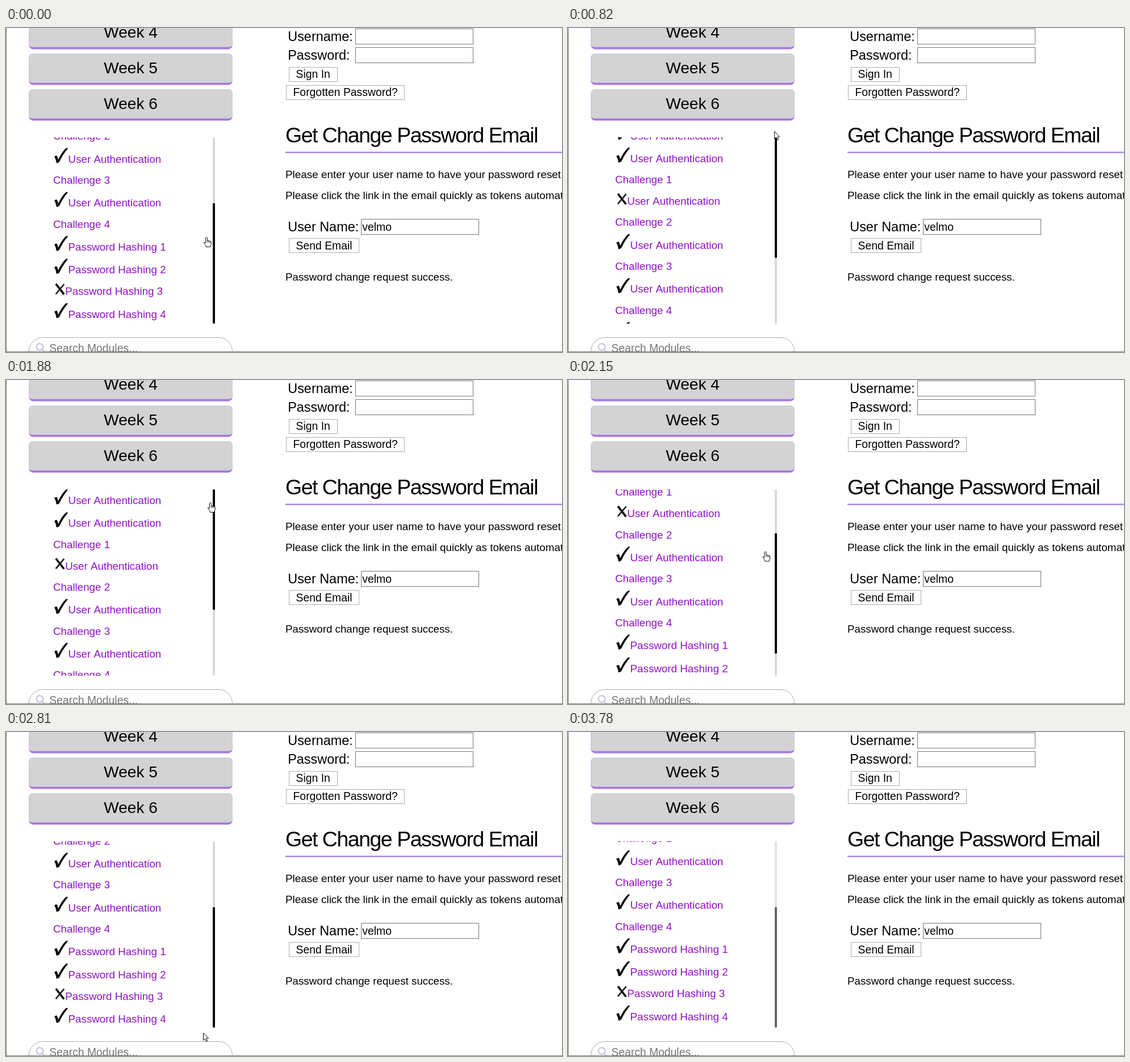
These frames come from a looping animation (979 by 572 pixels, 4340 ms). An HTML page with a canvas:

```html
<!DOCTYPE html>
<html lang="en">
<head>
<meta charset="utf-8">
<title>Module list scrolling</title>
<style>
  html, body { margin: 0; width: 100%; height: 100%; overflow: hidden; background: #fff; }
  canvas { display: block; }
</style>
</head>
<body>
<canvas id="stage" width="979" height="572"></canvas>
<script>
const ctx = document.getElementById('stage').getContext('2d');
const LOOP = 4340;
const LEAD = 20;
const FONT = '"Liberation Sans", Arial, sans-serif';
const PURPLE = '#a675ea';
const LINK = '#9010c4';
const LIST = { top: 193, height: 329, thumb: 213 };

// Two drags of the scrollbar; durations are counted in steps of `step` ms.
// The content follows the thumb late: `delay` and `shape` set its ease.
const up = {
  start: 0, step: 140, from: 38, to: 212.6, delay: 4.345, shape: 2.22,
  thumb: [1, 0], drag: 4.95, grip: 6,
  path: [[0, 353, 369], [4, 355, 223], [6, 363, 182], [9, 363, 182], [11, 363, 169]]
};
const down = {
  start: 1880, step: 135, from: 212.6, to: 35.1, delay: 2.535, shape: 1.3,
  thumb: [0, 1], drag: 3, grip: 4, release: 9, leave: 14,
  path: [[0, 360, 216], [4, 335, 389], [5, 347, 530], [8, 347, 531],
    [10, 463, 329], [11, 545, 340], [13, 570, 324]]
};

const rowHeight = { check: 40.35, cross: 37.9, plain: 37.3 };
const indent = { check: 109.6, cross: 104.2, plain: 83 };
const rows = [['check', 'User Authentication']];
for (let n = 1; n <= 4; n++) {
  rows.push([n === 2 ? 'cross' : 'check', 'User Authentication'], ['plain', 'Challenge ' + n]);
}
for (let n = 1; n <= 4; n++) {
  rows.push([n === 3 ? 'cross' : 'check', 'Password Hashing ' + n]);
}

const mix = (a, b, p) => a + (b - a) * p;

function along(path, k) {
  const n = path.findIndex(p => p[0] > k);
  if (n < 0) return path[path.length - 1].slice(1);
  const [a, b] = [path[n - 1], path[n]];
  const p = (k - a[0]) / (b[0] - a[0]);
  return [mix(a[1], b[1], p), mix(a[2], b[2], p)];
}

function text(str, x, y, size = 18.75, color = '#000', spacing = 0) {
  ctx.font = `${size}px ${FONT}`;
  ctx.letterSpacing = spacing + 'px';
  ctx.fillStyle = color;
  ctx.fillText(str, x, Math.round(y));
}

function rect(x, y, w, h, color) {
  ctx.fillStyle = color;
  ctx.fillRect(x, y, w, h);
}

function round(x, y, w, h, r, color) {
  ctx.beginPath();
  ctx.roundRect(x, y, w, h, r);
  ctx.fillStyle = color;
  ctx.fill();
}

function frame(x, y, w, h, color) {
  ctx.strokeStyle = color;
  ctx.lineWidth = 1;
  ctx.strokeRect(x + .5, Math.round(y) + .5, w - 1, h - 1);
}

function week(n) {
  const y = 45 + (n - 5) * 63;
  const inner = { x: 8, y: 4 };
  round(40.3, y, 358.5, 55.5, 8, PURPLE);
  round(40.3, y, 358.5, 51.7, [8, 8, inner, inner], '#d3d3d3');
  ctx.textAlign = 'center';
  text('Week ' + n, 219.5, y + 35, 28.1);
  ctx.textAlign = 'left';
}

function check(y) {
  ctx.save();
  ctx.translate(85, y);
  ctx.beginPath();
  ctx.moveTo(0, -4);
  ctx.quadraticCurveTo(4.5, -8, 5.5, -4);
  ctx.lineTo(7, 1);
  ctx.quadraticCurveTo(13, -12, 20.5, -19);
  ctx.quadraticCurveTo(23, -20, 24, -18.5);
  ctx.quadraticCurveTo(15, -8, 9, 5);
  ctx.quadraticCurveTo(6, 8, 3.5, 6.5);
  ctx.quadraticCurveTo(3, 0, 0, -4);
  ctx.fillStyle = '#0a0a0a';
  ctx.fill();
  ctx.restore();
}

function cross(y) {
  const line = (x1, x2, width) => {
    ctx.lineWidth = width;
    ctx.beginPath();
    ctx.moveTo(x1, y - 11.5);
    ctx.lineTo(x2, y + 4);
    ctx.stroke();
  };
  ctx.strokeStyle = '#1a1a1a';
  ctx.lineCap = 'square';
  line(89, 101, 3.8);
  line(101.5, 88.5, 2.6);
  ctx.lineCap = 'butt';
}

function list(drag, k) {
  const { top, height, thumb } = LIST;
  const eased = 1 - Math.exp(-((k / drag.delay) ** drag.shape));
  let y = mix(drag.from, drag.to, eased);

  ctx.save();
  ctx.beginPath();
  ctx.rect(80, top, 270, height);
  ctx.clip();
  rows.forEach(([kind, label], i) => {
    if (i) y += rowHeight[kind];
    if (kind === 'check') check(y);
    if (kind === 'cross') cross(y);
    text(label, indent[kind], y + 6.5, 18.75, LINK);
  });
  ctx.restore();

  const idle = k >= drag.release;
  const place = mix(...drag.thumb, Math.min(1, k / drag.drag));
  round(364, top, 4, height, 2, idle ? '#e2e2e2' : '#d9d9d9');
  round(364, top + place * (height - thumb), 4, thumb, 2, idle ? '#666' : '#000');
}

function search() {
  ctx.beginPath();
  ctx.roundRect(40.5, 546.5, 358, 50, 24);
  ctx.strokeStyle = '#a9a9a9';
  ctx.lineWidth = 1;
  ctx.stroke();
  ctx.beginPath();
  ctx.arc(59.5, 563, 5.8, 0, 7);
  ctx.moveTo(63.8, 567.3);
  ctx.lineTo(69, 572.5);
  ctx.strokeStyle = '#c6c6de';
  ctx.lineWidth = 2.2;
  ctx.stroke();
  text('Search Modules...', 76.3, 572, 19.35, '#757575');
}

function field(label, x, y, value = '') {
  text(label, 496.2, y + 22, 23.44);
  frame(x, y, 208, 28, '#767676');
  text(value, x + 2.3, y + 20.5, 19.4);
}

function button(label, x, y, w) {
  frame(x, y, w, 26, '#adadad');
  text(label, x + 12.5, y + 19.5, 19.4);
}

function forms() {
  field('Username:', 615, 1);
  field('Password:', 615, 34);
  button('Sign In', 498, 68.5, 86);
  button('Forgotten Password?', 493, 100.5, 209);

  text('Get Change Password Email', 492, 202, 37.5, '#000', -1.5);
  rect(492, 218.5, 487, 2.2, PURPLE);
  text('Please enter your user name to have your password reset link emailed to you.', 492, 265, 18.9);
  text('Please click the link in the email quickly as tokens automatically expire.', 492, 302, 18.9);

  field('User Name:', 625, 337, 'velmo');
  button('Send Email', 498, 371, 124);
  text('Password change request success.', 492, 446);
}

const arrow = new Path2D('M.5.5V13.6L3.5 10.9L5.6 15.7L7.6 14.8L5.6 10.2H9.6Z');
const hand = new Path2D('M-1.5 11V1.5Q0-.8 1.5 1.5V6.5Q3 5.2 4 7Q5.5 6 6.3 7.7' +
  'Q8.4 7 8.4 9.5V12.5L6.8 15.5V17.5H-.8V15.5L-4.4 10.8Q-4.6 8.6-2.8 9.4Z' +
  'M1.5 6.5V9.5M4 7V10M6.3 7.7V10.3');

function cursor(drag, k) {
  if (k >= drag.leave) return;
  const shape = k < drag.grip ? hand : arrow;
  ctx.save();
  ctx.translate(...along(drag.path, k));
  ctx.fillStyle = '#fff';
  ctx.fill(shape);
  ctx.strokeStyle = '#111';
  ctx.lineWidth = 1;
  ctx.stroke(shape);
  ctx.restore();
}

function draw(t) {
  const drag = t < down.start ? up : down;
  const k = Math.floor((t - drag.start + LEAD) / drag.step);
  rect(0, 0, 979, 572, '#fff');
  [4, 5, 6].forEach(week);
  forms();
  search();
  list(drag, k);
  rect(0, 0, 1, 572, '#777');
  rect(0, 571, 979, 1, '#777');
  cursor(drag, k);
}

const start = performance.now();
function tick() {
  draw((performance.now() - start) % LOOP);
  requestAnimationFrame(tick);
}
tick();
</script>
</body>
</html>
```
